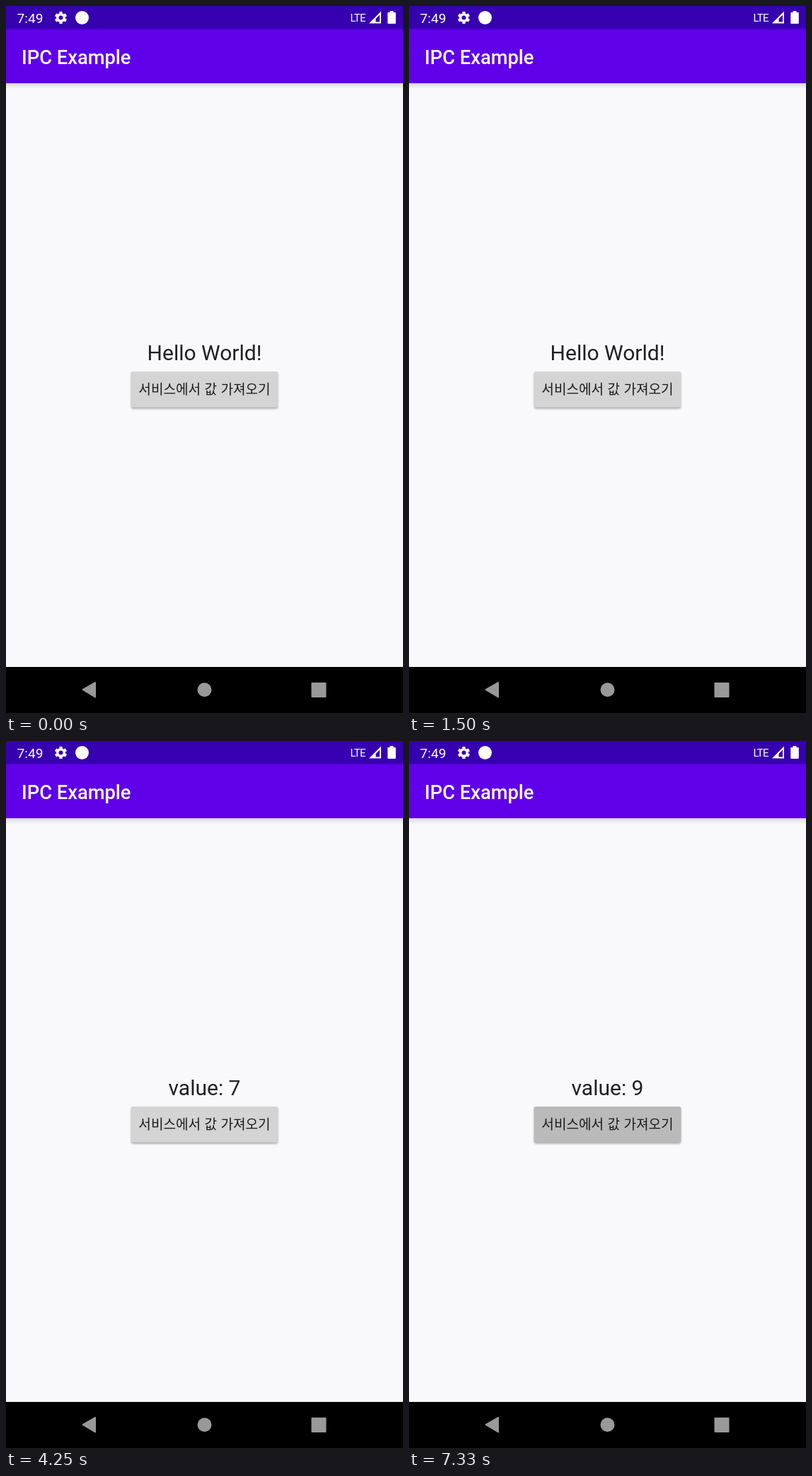
Write an HTML page that moves like this. It is 561 px wide and 998 px high and loops after 7.45 s.

```html
<!DOCTYPE html>
<html lang="ko">
<head>
<meta charset="utf-8">
<title>IPC Example</title>
<style>
  html, body { margin: 0; width: 100%; height: 100%; overflow: hidden; background: #f9f9fc; }
  svg { display: block; width: 561px; height: 998px; font-family: Roboto, sans-serif; }
</style>
</head>
<body>
<svg viewBox="0 0 561 998">
  <defs>
    <linearGradient id="shade" x2="0" y2="1">
      <stop offset="0" stop-opacity=".13"/>
      <stop offset="1" stop-opacity="0"/>
    </linearGradient>
    <filter id="soft" x="-5%" y="-20%" width="110%" height="140%"><feGaussianBlur stdDeviation="1.6"/></filter>
    <clipPath id="face"><rect x="176.5" y="516" width="208" height="50.5" rx="2.5"/></clipPath>
  </defs>

  <rect width="561" height="998" fill="#f9f9fc"/>
  <rect y="109" width="561" height="8" fill="url(#shade)"/>
  <rect y="32" width="561" height="77" fill="#5f00e9"/>
  <rect width="561" height="32.5" fill="#3600b0"/>

  <g fill="#fff">
    <text x="15.5" y="23.5" font-size="19.2">7:49</text>
    <g fill="none" stroke="#fff">
      <circle cx="77.5" cy="16.5" r="4.8" stroke-width="3.6"/>
      <circle cx="77.5" cy="16.5" r="7.3" stroke-width="2.8" pathLength="12" stroke-dasharray="1.1 .9" stroke-dashoffset="-.45"/>
    </g>
    <circle cx="107.5" cy="16.5" r="9.5"/>
    <text x="486.5" y="22" font-size="15" letter-spacing="-.7">LTE</text>
    <path d="M513 24.5 530 7.500V24.5ZM522.500 18V22.500H528V12.500Z" fill-rule="evenodd"/>
    <path d="M542.500 7h5v2h2.500q.8 0 .8.8V24q0 1-1 1h-9.500q-1 0-1-1V9.800q0-.8.8-.8h2.400z"/>
    <text x="22" y="81.500" font-size="27.300" font-weight="500">IPC Example</text>
  </g>

  <text id="label" x="280.500" y="500" font-size="30" text-anchor="middle" fill="#202022">Hello World!</text>

  <rect x="177" y="518" width="207" height="50.500" rx="2.500" opacity=".32" filter="url(#soft)"/>
  <g clip-path="url(#face)">
    <rect x="176" y="516" width="209" height="51" fill="#d4d4d4"/>
    <circle id="ripple" cy="541.300" opacity="0"/>
  </g>
  <text x="280.500" y="548" font-size="19.100" text-anchor="middle" fill="#1c1c1c"
    style="font-family:'Noto Sans CJK KR','Noto Sans CJK',sans-serif">서비스에서 값 가져오기</text>

  <rect y="933" width="561" height="65"/>
  <g fill="#999" stroke="#999" stroke-width="2" stroke-linejoin="round">
    <path d="M108.500 965 126 955V975.500Z"/>
    <circle cx="280.500" cy="965.300" r="9"/>
    <rect x="432.500" y="956" width="19" height="19"/>
  </g>
</svg>
<script>
  const LOOP = 7450, GROW = 225, FADE = 150, RELEASE = 90;
  const presses = [...Array.from({length: 7}, (_, i) => 1580 + 360 * i), 5790, 6290];
  const label = document.getElementById('label');
  const ripple = document.getElementById('ripple');
  const clamp = x => Math.max(0, Math.min(1, x));
  const mix = (a, b, k) => a + (b - a) * k;

  function draw(t) {
    const value = presses.filter(p => t >= p + RELEASE).length;
    const text = value ? 'value: ' + value : 'Hello World!';
    if (label.textContent !== text) label.textContent = text;

    const last = presses.filter(p => t >= p).length - 1;
    const age = last < 0 ? -1 : t - presses[last];
    const k = clamp(age / GROW), ease = k * k * (3 - 2 * k);
    // The final press stays highlighted until the loop restarts.
    const fade = last === presses.length - 1 ? 0 : clamp((age - GROW) / FADE);
    ripple.setAttribute('cx', mix(321, 280.5, ease));
    ripple.setAttribute('r', mix(62, 108, ease));
    ripple.setAttribute('opacity', .12 * clamp(age / 50) * (1 - fade));
  }

  const start = performance.now();
  function tick() {
    draw((performance.now() - start) % LOOP);
    requestAnimationFrame(tick);
  }
  tick();
</script>
</body>
</html>
```
